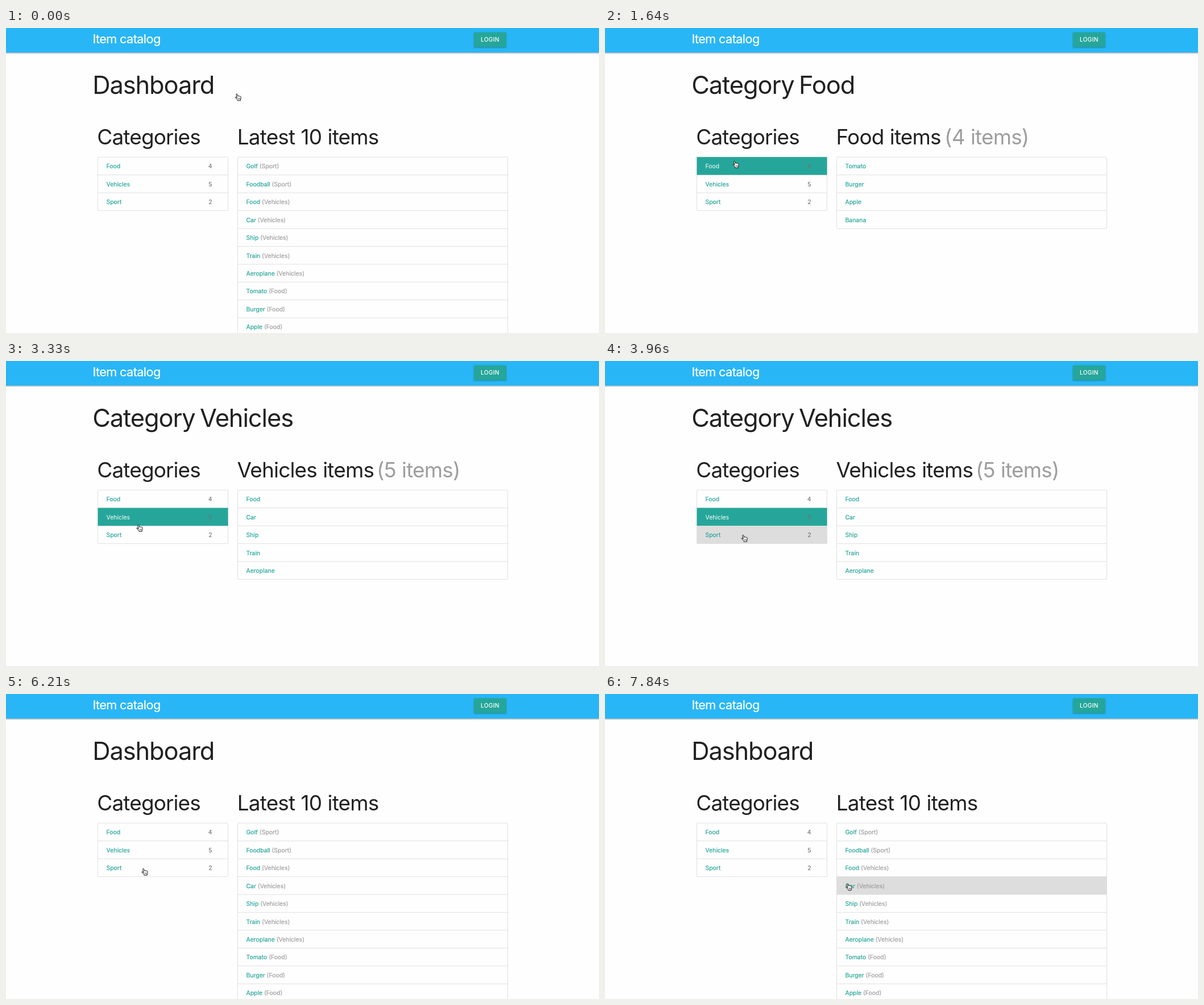
These frames come from a looping animation (1043x537 px, 7990 ms). An HTML page:

```html
<!DOCTYPE html>
<html lang="en">
<head>
<meta charset="utf-8">
<title>Item catalog</title>
<style>
  html, body { margin: 0; width: 100%; height: 100%; overflow: hidden; background: #fefefe; }
  svg { display: block; width: 100%; height: 100%; }
  text { font-family: Inter, Roboto, sans-serif; font-optical-sizing: none; font-size: 10.45px; white-space: pre; }
  .brand { font-size: 21.7px; letter-spacing: -.028em; fill: #fff; stroke: #fff; stroke-width: .2; }
  .login { font-size: 10.2px; font-weight: 500; letter-spacing: .025em; fill: #fff; }
  .h1 { font-size: 43.4px; letter-spacing: -.025em; fill: #212121; }
  .h2 { font-size: 36.9px; letter-spacing: -.022em; word-spacing: .02em; fill: #212121; }
  .link { fill: #26a69a; stroke: #26a69a; stroke-width: .2; }
  .on { fill: #fff; }
  .count { fill: #757575; stroke: #757575; stroke-width: .15; text-anchor: end; }
  .grey { fill: #9e9e9e; }
  .link .grey { stroke: #9e9e9e; }
  .line { fill: none; stroke: #e0e0e0; }
  .nav { filter: drop-shadow(0 1px 1.2px rgba(0,0,0,.38)); }
  .btn { filter: drop-shadow(0 1.2px 1px rgba(0,0,0,.28)); }
</style>
</head>
<body>
<svg viewBox="0 0 1043 537">
  <rect width="1043" height="537" fill="#fefefe"/>
  <rect class="nav" x="-9" y="-9" width="1061" height="52.3" fill="#29b6f6"/>
  <text class="brand" x="152.4" y="27.2">Item catalog</text>
  <rect class="btn" x="823" y="7.5" width="57" height="26.3" rx="1.5" fill="#26a69a"/>
  <text class="login" x="835" y="24.1">LOGIN</text>
  <g id="page"></g>
  <g id="hand" stroke="#111" stroke-linejoin="round" stroke-linecap="round">
    <path fill="#fff" d="M3.9 8 2.6 2.2C2.2.7 4 .2 4.5 1.6L5.5 5C5.8 3.9 7.2 4 7.4 5 7.9 4.1 9.1 4.4 9.2 5.4 9.9 4.7 11 5.1 11 6.2 11.2 8.5 10.6 9.4 10.2 10.6V12.6H5L4.6 11.2C3.6 10.2 2.6 8.6 1.2 7.6.2 6.8 1.2 5.8 2.2 6.4Z"/>
    <path fill="none" stroke-width=".6" d="M6.1 8.4V10.4M7.6 8.4V10.4M9.1 8.4V10.4"/>
  </g>
</svg>
<script>
const LOOP = 7990, TOP = 227.2, ROW = 31.45;
const page = document.getElementById('page');
const hand = document.getElementById('hand');

const cats = [
  { name: 'Food', items: ['Tomato', 'Burger', 'Apple', 'Banana'], noteX: 597 },
  { name: 'Vehicles', items: ['Food', 'Car', 'Ship', 'Train', 'Aeroplane'], noteX: 652 },
  { name: 'Sport', items: ['Golf', 'Foodball'], noteX: 604 }
];
const menu = cats.map(c => ({ name: c.name, count: c.items.length }));
const latest = [...cats].reverse()
  .flatMap(c => c.items.map(name => ({ name, tag: c.name }))).slice(0, 10);

// no category means the dashboard
const views = [
  { at: 0 }, { at: 1490, cat: 0 }, { at: 3030, cat: 1 }, { at: 4710, cat: 2 }, { at: 6210 }
];

// each move runs through its points in a few visible steps
const home = [408.3, 121.7];
const moves = [
  { from: 450, to: 980, steps: 4, path: [[230, 240]] },
  { from: 2230, to: 2590, steps: 3, path: [[235, 294]] },
  { from: 3780, to: 3960, steps: 2, path: [[245.3, 312]] },
  { from: 5160, to: 6060, steps: 7, path: [[385, 365], [412, 110], [385, 365], [244, 313]] },
  { from: 7040, to: 7840, steps: 6, path: [[429, 339.6]] }
];
moves.forEach((m, i) => m.path.unshift(i ? moves[i - 1].path.at(-1) : home));

const ease = p => p * p * p * (10 + p * (6 * p - 15));
const text = (cls, x, y, s) => `<text class="${cls}" x="${x}" y="${y}">${s}</text>`;

function pointer(t) {
  const m = moves.findLast(m => m.from <= t);
  if (!m) return { x: home[0], y: home[1], since: 0, p: 0 };
  const k = Math.floor((t - m.from) / (m.to - m.from) * (m.steps - 1));
  const p = ease(Math.min(1, (k + 1) / m.steps));
  const legs = m.path.length - 1;
  const i = Math.min(legs - 1, Math.floor(p * legs));
  const [x, y] = m.path[i].map((a, d) => a + (m.path[i + 1][d] - a) * (p * legs - i));
  return { x, y, since: m.from, p };
}

function list(x, width, rows, active, tip) {
  const inside = tip.x > x && tip.x < x + width;
  const hover = inside ? Math.floor((tip.y - TOP) / ROW) : -1;
  let lines = '', back = '', words = '';
  rows.forEach((row, i) => {
    const y = TOP + i * ROW, on = i === active;
    const alpha = on ? 1 : i === hover ? tip.glow : 0;
    if (i) lines += `<path class="line" d="M${x} ${y}h${width}"/>`;
    if (alpha) back += `<rect x="${x}" y="${y}" width="${width}" height="${ROW}" fill="${on ? '#26a69a' : '#ddd'}" opacity="${alpha}"/>`;
    const tag = row.tag ? `<tspan class="grey"> (${row.tag})</tspan>` : '';
    words += text(on ? 'on' : 'link', x + 15, y + 20.1, row.name + tag);
    if (row.count) words += text('count', x + 201, y + 20.1, row.count);
  });
  return `<rect class="line" x="${x}" y="${TOP}" width="${width}" height="${rows.length * ROW}" rx="1.5"/>`
    + lines + back + words;
}

function heading(cat) {
  const h1 = (x, s) => text('h1', x, 116.2, s);
  const h2 = (x, s) => text('h2', x, 205.3, s);
  const left = h2(160.3, 'Categories');
  if (!cat) return left + h1(152.2, 'Dashboard') + h2(406.8, 'Latest 10 items');
  return left + h1(152.2, 'Category') + h1(341, cat.name) + h2(406.6, cat.name + ' items')
    + h2(cat.noteX, `<tspan class="grey">(${cat.items.length} items)</tspan>`);
}

let shown;
function draw(t) {
  const view = views.findLast(v => v.at <= t);
  const cat = cats[view.cat];
  const { x, y, since, p } = pointer(t);
  // a fresh page has no hover until the pointer moves
  const tip = { x: x - 2.7, y: y - 5.5, glow: since >= view.at ? p : 0 };
  const rows = cat ? cat.items.map(name => ({ name })) : latest;
  const html = heading(cat) + list(161.5, 229, menu, view.cat, tip) + list(407.5, 475, rows, -1, tip);
  if (html !== shown) page.innerHTML = shown = html;
  hand.setAttribute('transform', `translate(${x - 6} ${y - 6.5})`);
}

function tick(now) {
  draw(now % LOOP);
  requestAnimationFrame(tick);
}
draw(0);
requestAnimationFrame(tick);
</script>
</body>
</html>
```
